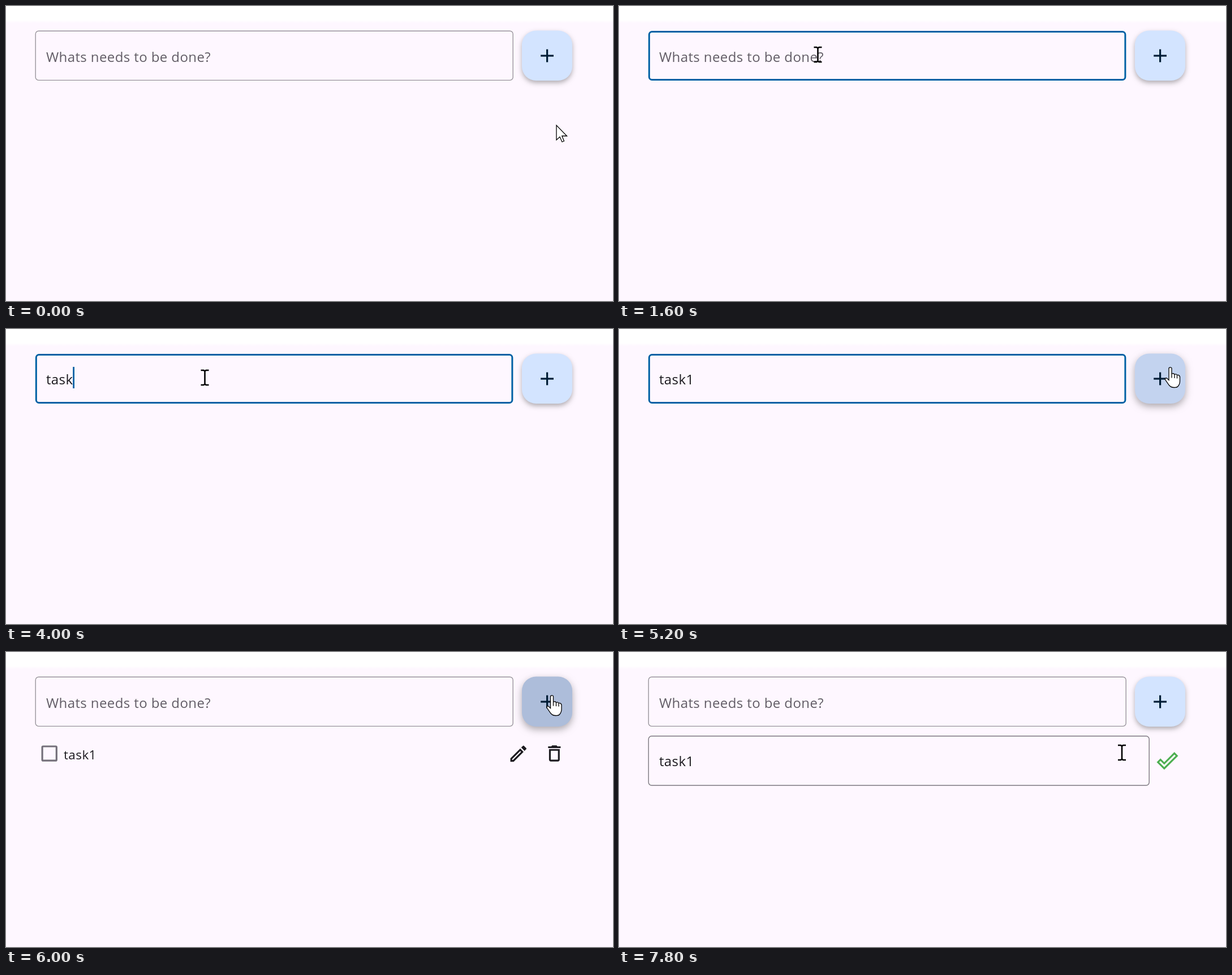
These frames come from a looping animation (1073x522 px, 8 s). An HTML page with a canvas:

```html
<!DOCTYPE html>
<html lang="en">
<head>
<meta charset="utf-8">
<title>Task list</title>
<style>
html, body { margin: 0; width: 100%; height: 100%; overflow: hidden; background: #fef7ff; }
canvas { display: block; }
</style>
</head>
<body>
<canvas id="stage" width="1073" height="522"></canvas>
<script>
const ctx = document.getElementById('stage').getContext('2d');
const LOOP = 8000, STEP = 200;
const INK = '#1d1b20', BLUE = '#0061a4';

const pencil = new Path2D('M14.06 9.02l.92.92L5.92 19H5v-.92l9.06-9.06M17.66 3c-.25 0-.51.1-.7.29l-1.83 1.83 3.75 3.75 1.83-1.83c.39-.39.39-1.02 0-1.41l-2.34-2.34c-.2-.2-.45-.29-.71-.29zm-3.6 3.19L3 17.25V21h3.75L17.81 9.94z');
const bin = new Path2D('M6 19c0 1.1.9 2 2 2h8c1.1 0 2-.9 2-2V7H6zM8 9h8v10H8zm7.5-5l-1-1h-5l-1 1H5v2h14V4z');
const tick = new Path2D('M19.77 5.03l1.4 1.4L8.43 19.17l-5.6-5.6 1.4-1.4 4.2 4.2zm0-2.83L8.43 13.54l-4.2-4.2L0 13.57 8.43 22 24 6.43z');
const arrow = new Path2D('M0 0V26L6 20.5 10 29.5 13.5 28 9.8 19H18.5Z');
const hand = new Path2D('M-2.5 2.5Q-2.5 .3 0 .3T2.5 2.5V12Q6 10 7.5 13Q10.5 11.5 12 14Q16 13 17 17V25Q17 30 13.5 34Q12 36 7 36Q1 36-2 32L-8.7 22.5Q-10 18.5-6 19.5L-2.5 23ZM2.5 12V19M7.5 13V19.5M12 14V20');
const beam = new Path2D('M-7-13H-2L0-11.5 2-13H7M-7 13H-2L0 11.5 2 13H7M0-12V12');

// Pointer moves: start, end, target x, target y, upward arc
const moves = [
  [0, 1000, 351.5, 86, 0],
  [4400, 5200, 974.5, 67.5, 63],
  [5200, 5600, 965, 76.5, 0],
  [6000, 6800, 906, 176, 0],
  [6800, 7600, 889, 178, 0]
];
const keys = [[2800, 't'], [3000, 'ta'], [3200, 'tas'], [4000, 'task'], [4200, 'task1'], [5800, '']];
// Caret opacity from each moment on
const blinks = [[1000, 1], [1400, .5], [1600, 0], [2000, .5], [2200, 1], [2600, .5], [2800, 1],
  [3600, .5], [3800, 0], [4000, 1], [4600, .5], [4800, 0], [5400, 1], [5800, 0]];

const at = (list, t, first) => list.reduce((v, [start, value]) => t >= start ? value : v, first);
const inside = (p, x, y, w, h) => p.x >= x && p.x <= x + w && p.y >= y && p.y <= y + h;

function pointer(t) {
  let x = 973, y = 211;
  for (const [start, end, tx, ty, arc] of moves) {
    const u = Math.min(1, Math.max(0, (t - start) / (end - start)));
    const e = u * u * (3 - 2 * u);
    x += (tx - x) * e;
    y += (ty - y) * e - arc * Math.sin(Math.PI * e);
  }
  return { x, y };
}

function text(str, x, y, color, size = 24, weight = 500) {
  ctx.font = `${weight} ${size}px "Open Sans", "Noto Sans", sans-serif`;
  ctx.letterSpacing = '0.4px';
  ctx.fillStyle = color;
  ctx.fillText(str, x, y);
  return ctx.measureText(str).width;
}

function box(x, y, w, h, r, color, line) {
  ctx.beginPath();
  ctx.roundRect(x, y, w, h, r);
  ctx.strokeStyle = color;
  ctx.lineWidth = line;
  ctx.stroke();
}

function field(y, w, hover, focus) {
  if (focus) box(53.3, y + 1.3, w - 2.4, 85, 5, BLUE, 3);
  else box(52.2, y, w, 87.2, 5.5, hover ? '#7b777f' : '#98949b', 1.4);
}

function icon(path, x, y, color) {
  ctx.save();
  ctx.translate(x, y);
  ctx.scale(1.58, 1.58);
  ctx.fillStyle = color;
  ctx.fill(path, 'evenodd');
  ctx.restore();
}

function disc(x, y, r, color) {
  ctx.beginPath();
  ctx.arc(x, y, r, 0, 7);
  ctx.fillStyle = color;
  ctx.fill();
}

function addButton(hover, pressed) {
  ctx.save();
  ctx.shadowColor = hover ? 'rgba(0,0,0,.32)' : 'rgba(0,0,0,.3)';
  ctx.shadowBlur = hover ? 13 : 9;
  ctx.shadowOffsetY = hover ? 5 : 4;
  ctx.fillStyle = pressed ? '#adbdda' : hover ? '#c3d3ef' : '#d3e4ff';
  ctx.beginPath();
  ctx.roundRect(912, 43.5, 89, 88.5, 25);
  ctx.fill();
  ctx.restore();
  ctx.fillStyle = '#001d36';
  ctx.fillRect(945.2, 86.4, 22.8, 3.2);
  ctx.fillRect(955, 76.6, 3.2, 22.8);
}

function cursor(p, kind) {
  ctx.save();
  ctx.translate(p.x, p.y);
  ctx.strokeStyle = '#000';
  ctx.fillStyle = '#fff';
  ctx.lineWidth = kind === beam ? 2.6 : 1.3;
  if (kind !== beam) ctx.fill(kind);
  ctx.stroke(kind);
  ctx.restore();
}

function draw(t) {
  const p = pointer(t);
  const listed = t >= 5800 && t < 7000, editing = t >= 7000;
  const focus = t >= 1200 && t < 5800;
  const overField = inside(p, 52, 44, 845, 87);
  const overButton = inside(p, 912, 43, 89, 89);
  const overPencil = listed && Math.hypot(p.x - 905.5, p.y - 180) < 32;
  const overEdit = editing && inside(p, 52, 149, 885, 87);

  ctx.fillStyle = '#fef7ff';
  ctx.fillRect(0, 0, 1073, 522);
  const strip = ctx.createLinearGradient(0, 25, 0, 30);
  strip.addColorStop(0, '#fff');
  strip.addColorStop(1, '#fef7ff');
  ctx.fillStyle = strip;
  ctx.fillRect(0, 0, 1073, 30);

  field(44.2, 844, overField, focus);
  const typed = at(keys, t, '');
  if (!typed) text('Whats needs to be done?', 71, 99, '#625d66');
  else if (t < 3000) text('Whats needs to be done?', 71, 99, 'rgba(98,93,102,.2)');
  const width = typed ? text(typed, 71, 97.5, INK) : 0;
  ctx.globalAlpha = at(blinks, t, 0);
  ctx.fillStyle = BLUE;
  ctx.fillRect(70.7 + width, typed ? 67 : 70, 2.8, typed ? 38 : 32);
  ctx.globalAlpha = 1;

  addButton(overButton, t >= 5800 && t < 6200);

  if (listed) {
    box(64.1, 167, 25.2, 25.2, 1.5, '#74707a', 3.2);
    text('task1', 102, 190, INK, 22.5, 400);
    if (overPencil) disc(905.5, 180, 32, 'rgba(73,69,79,.08)');
    icon(pencil, 886.8, 161, INK);
    icon(bin, 950.4, 160.6, INK);
  }
  if (editing) {
    field(148.8, 885, overEdit, false);
    text('task1', 71, 202, INK);
    icon(tick, 950.5, 173.5, '#4caf50');
  }

  if (t === 1000 || t === 5600 || t === 6800) disc(p.x - 2, p.y - 1.5, 8.8, 'rgba(236,72,118,.75)');
  cursor(p, overField || overEdit ? beam : overButton || overPencil ? hand : arrow);
}

function tickFrame() {
  draw(Math.floor(performance.now() % LOOP / STEP) * STEP);
  requestAnimationFrame(tickFrame);
}
tickFrame();
</script>
</body>
</html>
```
